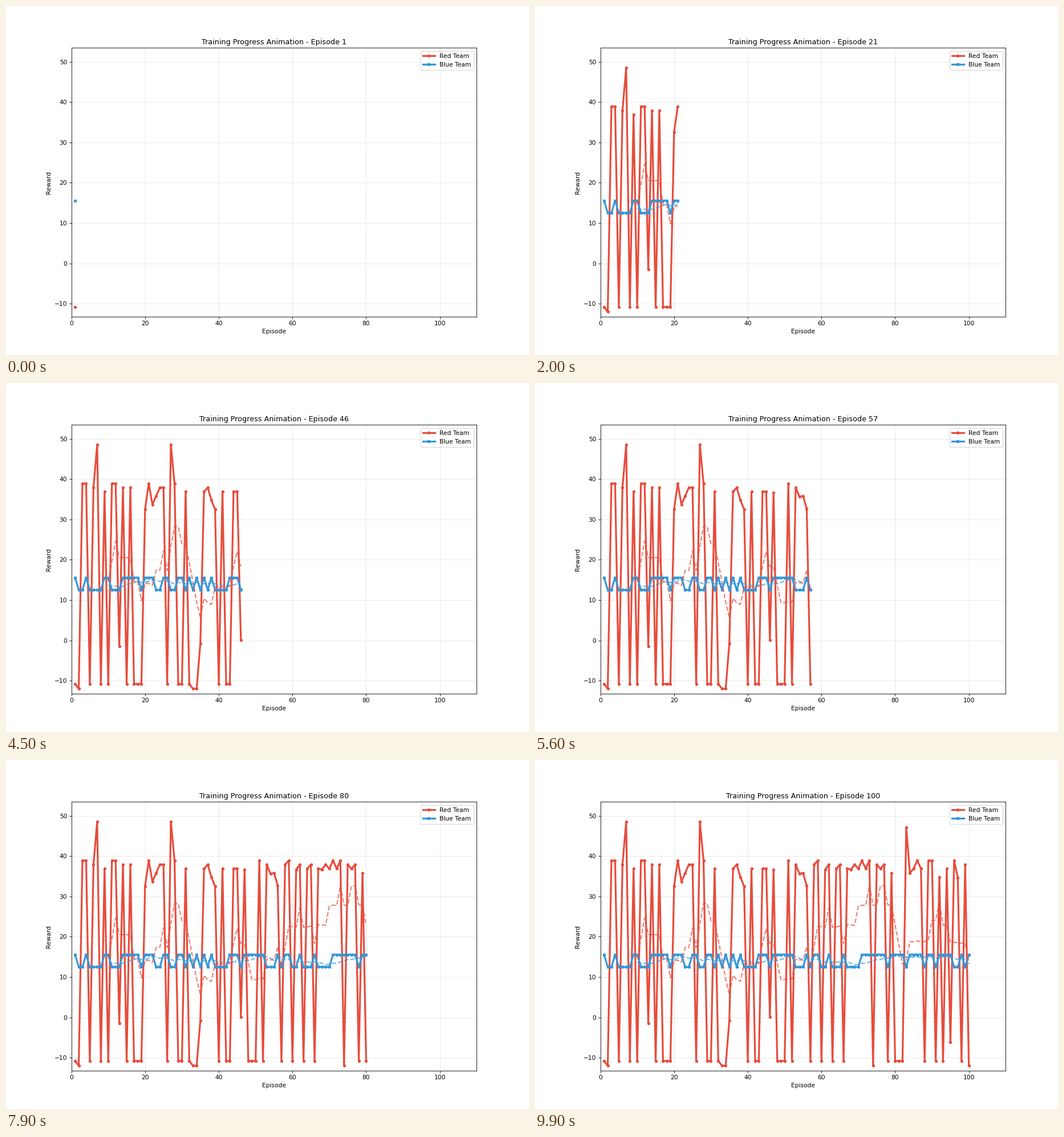
Recreate the animation shown at these times as a matplotlib script. Size 917 by 611 pixels, loop 10 s.

```python
import numpy as np
import matplotlib.pyplot as plt
from matplotlib.animation import FuncAnimation

EPISODES = 100
WINDOW = 10
RED, BLUE = "#e74c3c", "#3498db"

LOSS = -10.8
red = np.array([
    LOSS, -12, 38.9, 38.9, LOSS, 37.9, 48.5, LOSS, 36.9, LOSS,
    38.9, 38.9, -1.5, 37.9, LOSS, 37.9, LOSS, LOSS, LOSS, 32.6,
    38.9, 33.7, 35.8, 37.9, 37.9, LOSS, 48.6, 38.9, LOSS, LOSS,
    36.9, LOSS, -12, -12, -0.7, 36.9, 37.9, 34.8, 32.5, LOSS,
    36.9, LOSS, LOSS, 36.9, 36.9, 0.1, 36.7, LOSS, LOSS, LOSS,
    38.9, LOSS, 37.9, 35.7, 35.8, 32.7, LOSS, 37.9, 38.9, LOSS,
    36.7, 37.9, LOSS, 36.9, 37.9, LOSS, 36.9, 36.7, 37.9, 36.9,
    38.9, 36.9, 38.9, -12, 37.9, 36.9, 37.9, LOSS, 35.8, LOSS,
    LOSS, LOSS, 47.1, 35.8, 36.9, 38.9, 36.9, LOSS, 38.9, 38.9,
    LOSS, 34.8, LOSS, 36.9, -6.2, 38.9, 34.7, LOSS, 37.9, -12,
])

# Blue alternates between two rewards; these are the run lengths.
runs = [1, 2, 1, 4, 2, 3, 5, 1, 3, 2, 2, 2, 2, 1, 1, 1, 1, 1, 1, 1, 1, 4, 3,
        1, 6, 3, 1, 1, 2, 2, 1, 3, 1, 4, 7, 1, 4, 1, 4, 1, 2, 1, 4, 2, 1, 1, 1]
levels = np.where(np.arange(len(runs)) % 2 == 0, 15.6, 12.5)
blue = np.repeat(levels, runs)

episodes = np.arange(1, EPISODES + 1)


def moving_average(values):
    return np.convolve(values, np.ones(WINDOW) / WINDOW, mode="valid")


red_mean, blue_mean = moving_average(red), moving_average(blue)

dpi = 917 / 12
fig, ax = plt.subplots(figsize=(12, 611 / dpi), dpi=dpi)
ax.set_xlim(0, EPISODES * 1.1)
ax.set_ylim(red.min() * 1.1, red.max() * 1.1)
ax.set_xlabel("Episode")
ax.set_ylabel("Reward")
ax.grid(True, alpha=0.3)
title = ax.set_title("Training Progress Animation")

red_line, = ax.plot([], [], "o-", color=RED, lw=3, ms=4, label="Red Team")
blue_line, = ax.plot([], [], "s-", color=BLUE, lw=3, ms=4, label="Blue Team")
red_trend, = ax.plot([], [], "--", color=RED, lw=2, alpha=0.7)
blue_trend, = ax.plot([], [], "--", color=BLUE, lw=2, alpha=0.7)
ax.legend(loc="upper right")


def update(frame):
    n = frame + 1
    red_line.set_data(episodes[:n], red[:n])
    blue_line.set_data(episodes[:n], blue[:n])
    m = max(0, n - WINDOW + 1)
    trend_x = episodes[WINDOW - 1:WINDOW - 1 + m]
    red_trend.set_data(trend_x, red_mean[:m])
    blue_trend.set_data(trend_x, blue_mean[:m])
    title.set_text(f"Training Progress Animation - Episode {n}")
    return red_line, blue_line, red_trend, blue_trend, title


anim = FuncAnimation(fig, update, frames=EPISODES, interval=100,
                     repeat=True, repeat_delay=0, blit=False)
plt.show()
```
